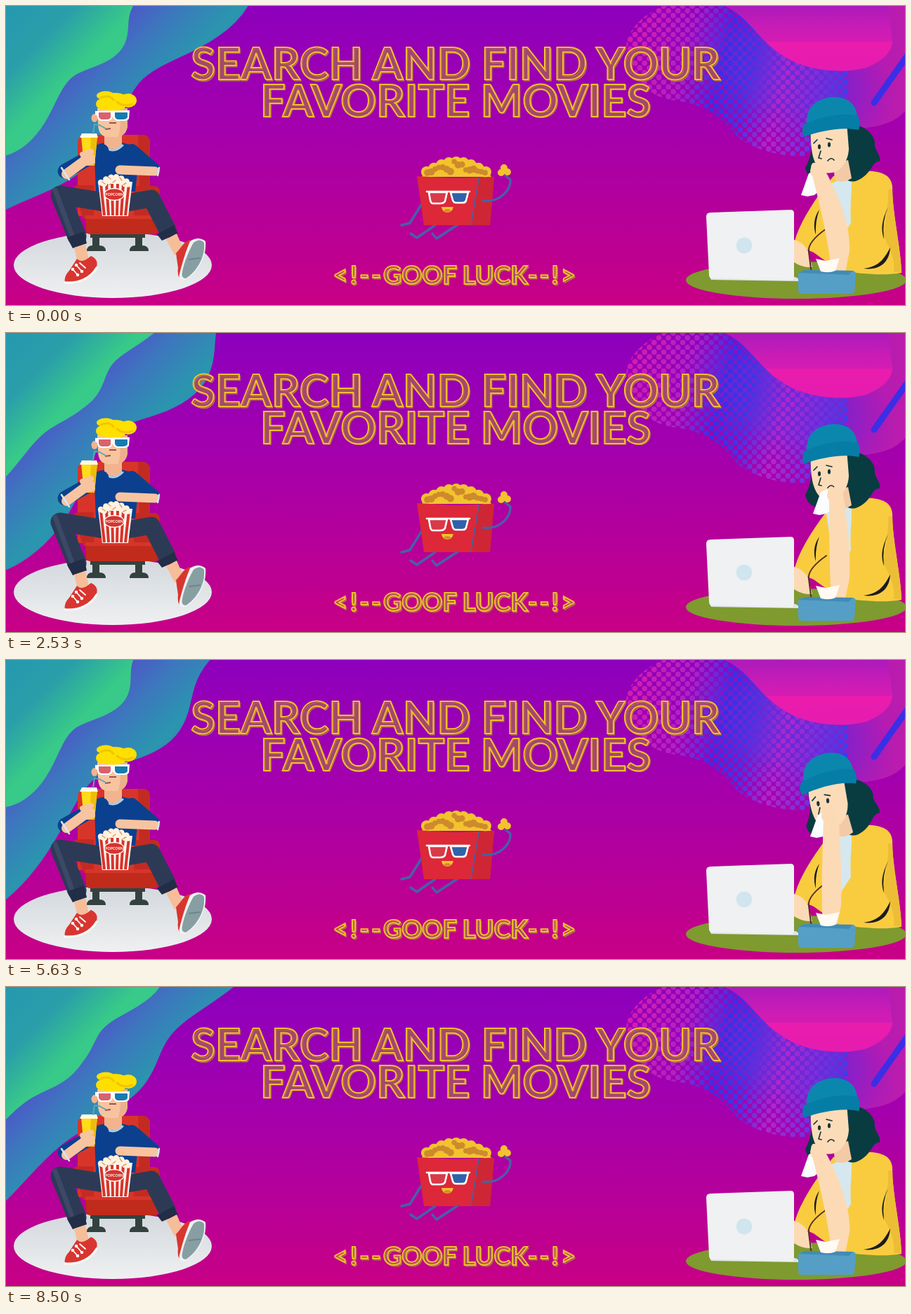
An HTML page that plays this animation: 1280x427 px, repeating every 8530 ms.

```html
<!DOCTYPE html>
<html lang="en">
<head>
<meta charset="utf-8">
<title>Search and find your favorite movies</title>
<style>
html, body { margin: 0; width: 100%; height: 100%; overflow: hidden; background: #a400ac; }
svg { display: block; width: 100vw; height: 100vh; }
text { font-family: Lato, sans-serif; font-weight: 700; text-anchor: middle; }
.big { font-size: 63px; }
.small { font-size: 36px; }
.wide { letter-spacing: 3.4px; }
.line { fill: none; stroke-linecap: round; stroke-linejoin: round; }
</style>
</head>
<body>
<svg viewBox="0 0 1280 427" preserveAspectRatio="none">
<defs>
  <linearGradient id="sky" x2="0" y2="1">
    <stop stop-color="#8d00bd"/><stop offset=".42" stop-color="#a500ac"/><stop offset="1" stop-color="#c80085"/>
  </linearGradient>
  <linearGradient id="greenFill" gradientUnits="userSpaceOnUse" x1="0" y1="0" x2="100" y2="100">
    <stop stop-color="#2598b0"/><stop offset=".5" stop-color="#2a9fa9"/><stop offset=".95" stop-color="#38ca88"/>
  </linearGradient>
  <linearGradient id="blueFill" gradientUnits="userSpaceOnUse" x1="90" y1="90" x2="165" y2="165">
    <stop stop-color="#4c58c8"/><stop offset=".45" stop-color="#3c78bd"/><stop offset="1" stop-color="#2b94af"/>
  </linearGradient>
  <linearGradient id="plum" gradientUnits="userSpaceOnUse" x1="1110" y1="0" x2="1280" y2="0">
    <stop stop-color="#b41cb4" stop-opacity="0"/><stop offset=".65" stop-color="#b01cb6"/><stop offset="1" stop-color="#bb1cac"/>
  </linearGradient>
  <radialGradient id="violet" gradientUnits="userSpaceOnUse" cx="0" cy="0" r="1" gradientTransform="translate(1105 95) rotate(20) scale(165 100)">
    <stop stop-color="#642cdc"/><stop offset=".45" stop-color="#6a2ad8" stop-opacity=".9"/><stop offset="1" stop-color="#8a18c4" stop-opacity="0"/>
  </radialGradient>
  <linearGradient id="dotFill" gradientUnits="userSpaceOnUse" x1="885" y1="60" x2="1200" y2="140">
    <stop stop-color="#d41cae"/><stop offset=".25" stop-color="#b022c4"/><stop offset=".42" stop-color="#3630e6"/>
    <stop offset=".55" stop-color="#4434e4"/><stop offset=".7" stop-color="#b026cc"/><stop offset=".84" stop-color="#7a30dc"/>
    <stop offset="1" stop-color="#3040ee"/>
  </linearGradient>
  <linearGradient id="pink" gradientUnits="userSpaceOnUse" x1="0" y1="0" x2="0" y2="100">
    <stop stop-color="#ac1abc"/><stop offset=".3" stop-color="#c81cb6"/><stop offset=".51" stop-color="#d41cb2"/>
    <stop offset=".51" stop-color="#ea1cad"/><stop offset="1" stop-color="#e41cb0"/>
  </linearGradient>
  <linearGradient id="floor" x2="0" y2="1">
    <stop stop-color="#d3d8dd"/><stop offset="1" stop-color="#eff0f1"/>
  </linearGradient>
  <clipPath id="dotClip">
    <path d="M883,58C885,30 915,8 935,0H1022C1060,8 1075,45 1105,65C1135,87 1160,95 1198,94V150L1140,214C1110,216 1065,208 1040,185C1015,150 985,138 945,134C905,125 885,90 883,58Z"/>
  </clipPath>
  <g id="title">
    <text class="big" x="640" y="105">SEARCH AND FIND YOUR</text>
    <text class="big" x="640" y="157.5">FAVORITE MOVIES</text>
    <text class="small" x="640" y="397"><tspan class="wide">&lt;!--</tspan>GOOF LUCK<tspan class="wide">--!&gt;</tspan></text>
  </g>
</defs>

<rect width="1280" height="427" fill="url(#sky)"/>

<g id="corner">
  <path fill="url(#plum)" d="M1110,0H1280V150C1262,170 1235,174 1200,176L1110,150Z"/>
  <path fill="url(#violet)" d="M935,0H1280V150C1262,170 1235,174 1205,176L1140,211C1110,212 1065,208 1040,185C1010,145 985,138 945,134Z"/>
  <path id="halftone" fill="url(#dotFill)" clip-path="url(#dotClip)"/>
  <path fill="url(#pink)" d="M1022,0C1055,12 1070,48 1105,70C1135,92 1190,98 1225,88C1250,78 1262,64 1262,50L1256,0Z"/>
  <path class="line" stroke="#3a2fe6" stroke-width="9" d="M1236,138L1284,70"/>
</g>

<path id="blueWave" fill="url(#blueFill)"/>
<path id="greenWave" fill="url(#greenFill)"/>

<use href="#title" x="1.6" y="1.6" fill="#a5466f" stroke="#b47f3a" stroke-width="1.2"/>
<use href="#title" fill="none" stroke="#f2bf2c" stroke-width="2"/>

<g id="viewer">
  <ellipse cx="152" cy="370" rx="141" ry="47" fill="url(#floor)"/>
  <path fill="#33423f" d="M120,322H198V331H194V342Q203,342 203,350H176Q176,342 184,342V331H133V342Q142,342 142,350H115Q115,342 123,342V331H120Z"/>
  <path fill="#d8352a" d="M102,196Q102,184 114,184H193Q205,184 205,196V300H102Z"/>
  <path fill="#c32b22" d="M188,184H193Q205,184 205,196V262H190ZM96,262Q96,256 104,256H125V304H110ZM182,257H212Q219,258 219,266L214,304H182Z"/>
  <path fill="#c02b1c" d="M113,299H217V320Q217,326 210,326H121Q114,326 114,320Z"/>
  <path fill="#d8352a" d="M113,299H217V304H113Z"/>
  <!-- trousers -->
  <path class="line" stroke="#2d3a56" stroke-width="27" d="M146,281L77,270L101,329"/>
  <path class="line" stroke="#3b4966" stroke-width="7" d="M70,263L93,325"/>
  <path class="line" stroke="#2d3a56" stroke-width="25" d="M172,281L207,275L229,318"/>
  <path fill="#222d47" d="M87,331L111,322L115,339L95,346ZM215,326L239,313L245,325L222,335Z"/>
  <!-- ankles and shoes -->
  <path fill="#f6bd99" d="M97,345L113,340L119,366L103,370ZM228,333L243,325L253,348L240,356Z"/>
  <path fill="#d93530" d="M101,361C108,368 116,361 121,357Q132,362 129,372C121,388 103,397 84,395Q82,386 90,378Z"/>
  <path class="line" stroke="#f7f7f7" stroke-width="3.5" d="M84,395C104,397 121,388 129,374"/>
  <path class="line" stroke="#fff" stroke-width="1.8" d="M95,376L102,384M100,370L108,379M105,367L113,374"/>
  <path class="line" stroke="#fff" stroke-width="4.5" d="M95,376h0M102,384h0M108,379h0M100,370h0"/>
  <path fill="#d93530" d="M242,353C250,345 252,337 262,334L270,345L252,392Q243,389 245,374Z"/>
  <path fill="#eef1f2" d="M262,336Q274,328 284,336C286,358 274,381 254,392Q245,393 247,383C250,370 256,350 262,336Z"/>
  <path fill="#879fa3" d="M267,338Q276,331 282,338C284,358 272,379 256,389Q249,389 251,380C253,368 260,350 267,338Z"/>
  <path stroke="#6d868b" stroke-width="2" d="M260,362L277,360"/>
  <!-- torso and head -->
  <path fill="#0b408f" d="M134,197Q153,190 172,197Q184,198 190,210L184,265H128L126,215Z"/>
  <path fill="#f2b48f" d="M140,177H165V200Q152,210 140,199Z"/>
  <path class="line" stroke="#a9cdea" stroke-width="3" d="M138,199Q152,213 166,199"/>
  <path fill="#f8c4a0" d="M130,146H173V172Q171,186 157,187H144Q132,186 131,170Z"/>
  <path fill="#eeb08c" d="M161,146H173V172Q171,184 160,187Q165,168 161,146Z"/>
  <ellipse cx="126" cy="160" rx="4.5" ry="6" fill="#f2b48f"/>
  <g fill="#ffdf00">
    <ellipse cx="142" cy="128" rx="13" ry="6.5"/><ellipse cx="156" cy="133" rx="18" ry="9"/>
    <ellipse cx="138" cy="140" rx="10" ry="8"/><ellipse cx="153" cy="142" rx="18" ry="8"/><ellipse cx="174" cy="135" rx="12" ry="10"/>
  </g>
  <path class="line" stroke="#f1c500" stroke-width="3" d="M135,131Q147,126 153,134M158,137Q168,145 180,140"/>
  <path fill="#fff" d="M127,150L176,149L175,161Q173,164 168,164H158Q154,163 152,158Q150,164 145,164H136Q130,164 130,157L127,155Z"/>
  <path fill="#d9626c" d="M132,152H149V159Q148,162 144,162H136Q132,161 132,157Z"/>
  <path fill="#167bae" d="M155,152H173V159Q171,162 167,162H159Q155,161 155,157Z"/>
  <path stroke="#9d5148" stroke-width="2" d="M141,176L149,175M147,167H157"/>
  <!-- arms, cup and bucket -->
  <path class="line" stroke="#0b408f" stroke-width="21" d="M136,207L84,236"/>
  <path class="line" stroke="#f8c4a0" stroke-width="14" d="M86,240L116,218"/>
  <path class="line" stroke="#d7e5f3" stroke-width="2.5" d="M79,231L90,248"/>
  <path fill="#ffdc18" d="M107,186H130L126,228H111Z"/>
  <path fill="#eebd0a" d="M121,186H130L126,228H119Z"/>
  <path fill="#fffbe7" d="M108,182H129L131,188H105Z"/>
  <path class="line" stroke="#58a8b6" stroke-width="2" d="M124,182L126,169L133,170L142,175"/>
  <path class="line" stroke="#f8c4a0" stroke-width="8" d="M109,212L121,208M110,218L123,216M112,224L123,222"/>
  <path class="line" stroke="#0b408f" stroke-width="20" d="M179,207L209,233"/>
  <path class="line" stroke="#f8c4a0" stroke-width="13" d="M212,236L162,234"/>
  <path class="line" stroke="#d7e5f3" stroke-width="2.5" d="M218,231L216,242"/>
  <path fill="#fff6ee" d="M131,251H180L174,300H137Z"/>
  <g id="stripes" stroke="#d6342c" stroke-width="4"></g>
  <g id="kernels" fill="#fff2df"></g>
  <path class="line" stroke="#dc9c70" stroke-width="1.5" d="M137,251l4,3m4,-10l4,3m3,5l4,-3m6,-4l3,4m2,6l4,-2m-25,3l3,-2"/>
  <ellipse cx="154" cy="269" rx="14" ry="8.5" fill="#d6342c" stroke="#fff" stroke-width="1.3"/>
  <text x="154" y="271" font-size="5.2" fill="#fff">POPCORN</text>
</g>

<g id="mascot">
  <g class="line" stroke="#4563a6" stroke-width="3.4">
    <path d="M593,281L575,310L563,313"/>
    <path d="M611,313L585,331L576,325M645,311L613,332L607,325"/>
  </g>
  <path fill="#f2c32f" d="M592,244Q600,222 640,222T691,244Z"/>
  <g id="corn" fill="#f2c32f"></g>
  <g id="spots" fill="#ce8a2c"></g>
  <path fill="#dc2838" d="M585,243L640,246L695,244L689,313H595Z"/>
  <path fill="#cf2636" d="M673,245L695,244L689,313H662Z"/>
  <path class="line" stroke="#4563a6" stroke-width="1.7" stroke-dasharray="13 3" d="M673,246L662,312"/>
  <path class="line" stroke="#4563a6" stroke-width="3.2" d="M679,278C704,281 719,262 718,248L711,242"/>
  <path class="line" stroke="#f2c32f" stroke-width="10" d="M705,238h0M709,231h0M714,237h0"/>
  <g stroke="#fff" stroke-width="2.6" stroke-linejoin="round">
    <path class="line" d="M599,265H660"/>
    <path fill="#d83a49" d="M602,266H628L625,279Q623,282 618,282H608Q605,282 604,277Z"/>
    <path fill="#2f62a8" d="M633,266H658L655,278Q654,281 650,281H641Q637,281 636,277Z"/>
  </g>
  <path fill="#f2c32f" d="M620,287H637Q635,295 628,295Q621,294 620,287Z"/>
  <path fill="#d98a2a" d="M623,292Q628,288 634,292Q628,297 623,292Z"/>
</g>

<g id="crier">
  <ellipse cx="1125" cy="391.5" rx="157" ry="26.5" fill="#7f9a2f"/>
  <path fill="#f9cc40" d="M1178,243L1210,236C1240,234 1262,238 1262,260C1262,295 1274,345 1275,381C1250,386 1215,382 1186,378L1150,352L1122,340C1128,312 1150,280 1163,262Z"/>
  <path fill="#ecbe35" d="M1256,262C1257,290 1250,310 1250,330C1256,344 1266,356 1264,380H1275C1274,345 1262,295 1262,262Z"/>
  <path fill="#d5e8ef" d="M1168,256L1203,242C1206,262 1201,280 1203,310L1180,345Z"/>
  <path fill="#1c1c20" d="M1256,287C1247,306 1245,318 1250,333Q1247,307 1256,287ZM1259,345C1258,365 1245,378 1221,375C1245,372 1251,359 1259,345ZM1158,291C1149,303 1150,318 1153,326Q1152,307 1158,291Z"/>
  <path fill="#fcdab5" d="M1122,334Q1135,337 1142,350L1148,373Q1134,374 1122,366Z"/>
  <path class="line" stroke="#573029" stroke-width="2" d="M1168,318Q1141,337 1143,351L1147,383"/>
  <g id="head">
    <path fill="#083c40" d="M1187,170C1215,165 1234,178 1237,194C1235,206 1246,211 1244,222C1231,222 1234,241 1210,250C1198,253 1188,244 1190,230ZM1141,172C1150,198 1147,215 1138,231C1141,246 1152,252 1166,246L1172,200Z"/>
    <path fill="#f3caa5" d="M1178,226L1199,220L1204,246Q1190,255 1180,248Z"/>
    <path fill="#fcdcb8" d="M1146,166C1144,205 1149,232 1166,238C1186,242 1199,224 1200,204L1197,166Z"/>
    <path fill="#0b87ae" d="M1140,168C1138,141 1160,130 1180,130C1201,131 1214,142 1212,168Z"/>
    <path fill="#067da6" d="M1136,169C1160,157 1193,151 1213,157Q1218,166 1214,177C1190,172 1160,178 1136,187Q1132,178 1136,169Z"/>
    <g fill="#173438"><ellipse cx="1158" cy="201" rx="2.1" ry="3.6"/><ellipse cx="1172" cy="198" rx="2.1" ry="3.6"/></g>
    <path class="line" stroke="#173438" stroke-width="1.7" d="M1150,196L1155,191M1168,189L1176,191M1160,207L1157,217L1161,218M1170,221Q1175,215 1179,220"/>
  </g>
  <path id="tissue" fill="#fafcfd" d="M8,-20L18,-9L11,10L4,16L-6,18L-15,16L-10,2L-4,-15Z"/>
  <path id="forearm" fill="#fcdab5"/>
  <path id="hand" fill="#fcdab5" d="M-10,-3Q-9,-13 -2,-9Q2,-15 7,-7Q13,-7 12,3L15,21L-3,22L-7,10Q-13,5 -10,-3Z"/>
  <path fill="#dfe3e9" d="M1002,387H1122Q1130,388 1128,393L1004,391Z"/>
  <path fill="#eff1f2" d="M1003,295L1117,291Q1122,291 1122,296V387Q1122,392 1117,392L1006,389Q1001,389 1001,384L997,301Q997,295 1003,295Z"/>
  <circle cx="1051" cy="342" r="11.3" fill="#d0e5ee"/>
  <path fill="#559fc6" d="M1128,381L1137,377L1206,378Q1210,379 1210,383L1208,407Q1207,411 1203,411H1133Q1128,410 1128,406Z"/>
  <path fill="#438bb5" d="M1128,381L1137,377L1206,378L1200,384Z"/>
  <path fill="#fffaf4" d="M1153,361L1167,364L1187,360L1181,378Q1172,382 1160,379Z"/>
</g>
</svg>

<script>
const $ = id => document.getElementById(id);
const LOOP = 8530, WAVE = 3800, CRY = LOOP / 2;
const RAD = Math.PI / 180;

// mid: radius on the diagonal, rise: extra at the screen edges, amp and swell: ripple
// height likewise; from, turn and bend (degrees) delay the ripple along the edge.
const blue = { period: WAVE, mid: 221, rise: 96, amp: 16, swell: 12, from: 370, turn: -530, bend: -40 };
const green = { period: WAVE / 2, mid: 146, rise: 54, amp: 8, swell: 11, from: 175, turn: 590, bend: 35 };

function wavePath(w, time) {
  let d = 'M0,0';
  for (let angle = 0; angle <= 90; angle += 2) {
    const s = angle / 90;
    const edge = Math.abs(2 * s - 1) ** 1.7;
    const lag = w.from + w.turn * s + w.bend * Math.sin(Math.PI * s);
    const ripple = Math.cos(2 * Math.PI * time / w.period - lag * RAD);
    const r = w.mid + w.rise * edge + (w.amp + w.swell * edge) * ripple;
    d += `L${r * Math.cos(angle * RAD)},${r * Math.sin(angle * RAD)}`;
  }
  return d + 'Z';
}

function ease(t, from, to) {
  const u = Math.max(0, Math.min(1, (t - from) / (to - from)));
  return u * u * (3 - 2 * u);
}

// Seeded noise in 0..1
function noise(n) {
  const v = Math.sin(n * 12.9898 + 4.1) * 43758.5453;
  return v - Math.floor(v);
}

const repeat = (n, make) => Array.from({ length: n }, (_, i) => make(i, i / (n - 1))).join('');
const disc = (x, y, r) => `<circle cx="${x}" cy="${y}" r="${r}"/>`;

function buildStatic() {
  const pitch = 13.6, r = 3.9;
  let d = '';
  for (let row = 0; row < 33; row++)
    for (let x = 882 + row % 2 * pitch / 2; x < 1202; x += pitch)
      d += `M${x - r},${row * pitch / 2}a${r},${r} 0 1 0 ${2 * r},0a${r},${r} 0 1 0 ${-2 * r},0`;
  $('halftone').setAttribute('d', d);

  const dome = u => Math.sin(Math.PI * u);
  $('corn').innerHTML = repeat(9, (i, u) => disc(599 + 84 * u, 237 - 14 * dome(u), 8));
  $('spots').innerHTML = repeat(16, (i, u) =>
    disc(600 + 82 * u, 238 - 16 * dome(u) * noise(i), 3.5 + 1.8 * noise(i + 40)));
  $('kernels').innerHTML = repeat(17, (i, u) => disc(135 + 39 * u, 252 - 8 * dome(u) + i % 3 * 2.5, 4.2));
  $('stripes').innerHTML = repeat(6, i => `<path d="M${135 + i * 8},254L${140 + i * 6},299"/>`);
}

function drawCrier(t) {
  const wipe = ease(t, 250, 1050) - ease(t, 1500, 2350);
  const lean = ease(t, 1500, 2350) - ease(t, 2800, 3750);
  const hx = 1156 + 16 * wipe + 24 * lean, hy = 234 - 13 * wipe - 4 * lean;
  const ex = 1187 - 12 * wipe;
  const tx = 1147 + 13 * wipe + 17 * lean, ty = 254 - 18 * wipe - 12 * lean;
  $('head').setAttribute('transform', `rotate(${-5 * wipe} 1205 222)`);
  $('hand').setAttribute('transform', `translate(${hx} ${hy})`);
  $('tissue').setAttribute('transform', `translate(${tx} ${ty})`);
  $('forearm').setAttribute('d',
    `M${hx - 8},${hy + 8}L${hx + 13},${hy + 6}Q${ex + 16},305 ${ex + 14},350L${ex + 8},380H${ex - 12}Q${ex - 15},335 ${hx - 8},${hy + 8}Z`);
}

function draw(time) {
  const t = time % LOOP;
  $('blueWave').setAttribute('d', wavePath(blue, t));
  $('greenWave').setAttribute('d', wavePath(green, t));
  drawCrier(t % CRY);
}

buildStatic();
const start = performance.now();
function tick() {
  draw(performance.now() - start);
  requestAnimationFrame(tick);
}
tick();
</script>
</body>
</html>
```
